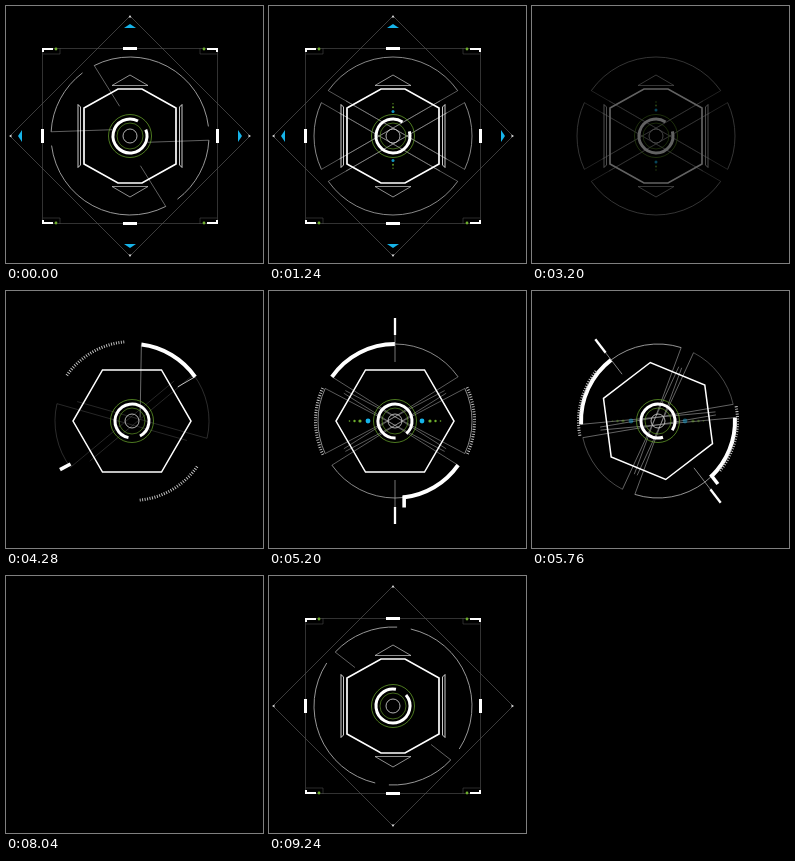
Animation, 257 px wide and 257 px high, one loop 9280 ms. Source, as an HTML page:

```html
<!DOCTYPE html>
<html lang="en">
<head>
<meta charset="utf-8">
<title>HUD target</title>
<style>
html, body { margin: 0; width: 100%; height: 100%; overflow: hidden; background: #000; }
svg { display: block; width: 100vw; height: 100vh; }
text { font: 600 3.6px "Open Sans", Arial, sans-serif; letter-spacing: 1px; }
</style>
</head>
<body>
<svg id="hud" viewBox="0 0 257 257"></svg>
<script>
const LOOP = 9280, STEP = 40;
const GREEN = '#6fae2e', CYAN = '#16b4ea', WHITE = '#fff', GREY = '#aaa', DIM = '#555';
const hud = document.getElementById('hud');

const clamp = v => Math.max(0, Math.min(1, v));
const part = (t, a, b) => clamp((t - a) / (b - a));
const out = u => 1 - (1 - u) ** 3;
const backIn = u => u * u * (2.7 * u - 1.7);

// Eased value through time/value pairs.
function key(t, ...k) {
  if (t <= k[0]) return k[1];
  for (let i = 2; i < k.length; i += 2) {
    if (t <= k[i]) return k[i - 1] + (k[i + 1] - k[i - 1]) * out(part(t, k[i - 2], k[i]));
  }
  return k[k.length - 1];
}

const polar = (r, deg) => [r * Math.cos(deg * Math.PI / 180), r * Math.sin(deg * Math.PI / 180)];
const path = (d, w, color = WHITE, extra = '') =>
  `<path d="${d}" fill="none" stroke="${color}" stroke-width="${w}" ${extra}/>`;
const line = (x1, y1, x2, y2, w, color) => path(`M${x1} ${y1}L${x2} ${y2}`, w, color);
const ring = (r, w, color) => `<circle r="${r}" fill="none" stroke="${color}" stroke-width="${w}"/>`;
const dot = (x, y, r, color) => `<circle cx="${x}" cy="${y}" r="${r}" fill="${color}"/>`;
const group = (body, transform = '', opacity = 1) =>
  opacity > 0 ? `<g transform="${transform}" opacity="${opacity}">${body}</g>` : '';
const twice = body => body + group(body, 'rotate(180)');
const four = body => twice(body + group(body, 'rotate(90)'));
const mirrored = body => body + group(body, 'scale(-1 1)');

function arc(r, a, b, w, color, extra) {
  const large = b - a > 180 ? 1 : 0;
  return path(`M${polar(r, a)}A${r} ${r} 0 ${large} 1 ${polar(r, b)}`, w, color, extra);
}

function ray(r, a, dir, length, w, color) {
  if (length <= 0) return '';
  const [x, y] = polar(r, a), [dx, dy] = polar(length, dir);
  return line(x, y, x + dx, y + dy, w, color);
}

function core(gap) {
  return ring(21.5, .7, GREEN) + ring(13, .6, GREEN) + ring(7, .8, '#ddd') +
    arc(17, gap + 20, gap + 340, 3, WHITE);
}

// Two wide and two narrow sectors; edge lines run on past the centre.
function sectors(r, lean, turn, big, small, lens, ink) {
  const [smallStart, bigStart, smallEnd, bigEnd] = lens;
  const narrow = 30 - lean, wide = 30 + lean;
  return group(twice(
    group(arc(r, -145, -35, .8, GREY), '', big) +
    group(arc(r, -25, 25, .8, GREY), '', small) +
    group(ray(r, -25, 180 - narrow, smallStart, .6, GREY) + ray(r, -145, wide, bigStart, .6, GREY) +
      ray(r, 25, 180 + narrow, smallEnd, .6, GREY) + ray(r, -35, 180 - wide, bigEnd, .6, GREY), '', ink)
  ), `rotate(${turn})`);
}

function corner() {
  return path('M-87 -84V-87H-77', 2) + dot(-74, -87, 1.4, GREEN) +
    path('M-87 -82H-70V-88', .5, DIM);
}

function frameOne() {
  const corners = mirrored(corner());
  return path('M-87.5 -87.5H87.5V87.5H-87.5Z', .6, DIM) +
    corners + group(corners, 'scale(1 -1)') + four(line(-7, -87.5, 7, -87.5, 3));
}

function shield() {
  const bar = path('M-52 -31.5V31.5L-49.5 29V-29Z', .8, WHITE);
  return path('M-12 -47H12L46 -28V28L12 47H-12L-46 28V-28Z', 1.7) +
    twice(path('M-18 -50.5L0 -61L18 -50.5Z', .7, '#ccc') + bar);
}

function diamond(cyan) {
  return path('M0 -120L120 0L0 120L-120 0Z', .6, '#666') +
    four('<path d="M-1.5 -118.5L0 -121L1.5 -118.5Z" fill="#ddd"/>' +
      group(`<path d="M-6 -108H6L0 -112Z" fill="${CYAN}"/>`, '', cyan));
}

function sceneOne(t) {
  const turn = 428 * (1 - part(t, -40, 960)) ** 2.4 - Math.min(0, t + 40);
  const gap = t < -40 ? -60 + (t + 40) * .45 : -36 - 6 * 2 ** (-t / 20);
  const lens = [25 + (t + 40) * .9, (t + 40) * 1.2, (t - 120) * .5, (t - 160) * .5]
    .map((v, i) => t < (i ? 0 : -40) ? 0 : Math.min(137, v));
  const leave = 1 - backIn(part(t, 2500, 2880));
  const size = out(part(t, -880, -120)) * leave;
  const square = part(t, -700, -300) * (1 - part(t, 2600, 2880));
  const hex = out(part(t, -800, -240));
  const cyan = t < 0 ? 0 : 1 - part(t, 1920, 2240);
  const slide = out(part(t, 960, 1600));
  const dots = twice([[26, 1.5, CYAN], [30.5, 1, GREEN], [34, .7, GREEN]]
    .map(([y, r, c]) => dot(0, -y * (.7 + .3 * slide), r, c)).join(''));
  const body =
    group(diamond(cyan), `scale(${size})`, size > .01 ? 1 : 0) +
    group(frameOne(), '', square) +
    group(sectors(79, 0, turn, 1, 1, lens, .85), '', part(t, -520, -100)) +
    group(shield(), `scale(${hex})`, hex) +
    group(core(gap), `scale(${out(part(t, -880, -560))})`) +
    group(dots, '', slide);
  return group(body, 'translate(124 130)', 1 - part(t, 2880, 3400));
}

// Two heavy arcs, only one of them ending in a cap.
function thickArcs(t) {
  const start = key(t, 3720, 35, 4280, -83, 4640, -145);
  const span = key(t, 4280, 48, 4640, 55);
  const early = 1 - part(t, 4280, 4600);
  const grown = part(t, 4280, 4400);
  const guides = ray(77, 0, 174, 73, .6, GREY) + ray(77, 48, 233, 20, .7, WHITE);
  const cap = ray(75, 48, 55, 12, 3.6, WHITE);
  return group(arc(77, 0, span, 4, WHITE) + group(guides, '', early) +
    group(group(arc(77, 0, 49, 4, WHITE), '', grown) + cap, 'rotate(180)'),
    `rotate(${start})`, part(t, 3880, 4160));
}

function brackets(t) {
  const show = part(t, 5800, 6200) * (1 - part(t, 6640, 7120));
  const grow = out(part(t, 5800, 6480));
  const word = 'LOCATION'.slice(0, Math.floor(8 * part(t, 5960, 6480)));
  const body =
    path('M-88 -73V-77H-78', 1.7) + dot(-88.5, -70, 1.7, GREEN) +
    `<text x="-74.5" y="-75.5" fill="#fff">${word}</text>` +
    path('M89 -75V-79H79', 1.7) + line(89, -79, 89 - 43 * grow, -79, .8, '#ddd') +
    dot(88.5, -73, 1.5, GREEN) +
    path('M-88 72V76H-78', 1.7) + line(-88, 76, -88 + 42 * grow, 76, .8, '#ddd') +
    dot(-88.5, 69, 1.9, GREEN) +
    path('M89 72V76H79', 1.7) + line(89, 76, 89 - 43 * grow, 76, .8, '#ddd') +
    dot(88.5, 70, 1.4, GREEN);
  return group(body, '', show);
}

function sceneTwo(t) {
  const turn = key(t, 5600, 0, 6560, -89, 6800, -90);
  const spin = key(t, 3720, -150, 4280, -12, 4640, 0);
  const gap = key(t, 3720, 250, 4280, 82, 5200, 68, 5600, 66, 6560, 35, 7520, 0);
  const dash = key(t, 3720, 330, 4280, 215, 4680, 205, 5160, 155, 5600, 155, 6560, 189, 7520, 180);
  const hexSize = key(t, 3720, 1.7, 4200, 1);
  const big = part(t, 4360, 4600);
  const small = key(t, 3960, 0, 4240, .3, 4400, .3, 4640, 1, 5640, 1, 6200, 0);
  const ink = key(t, 3960, 0, 4240, .35, 4400, .35, 4640, .9);
  const tickTurn = key(t, 4680, -65, 5160, 0);
  const tickIn = part(t, 4680, 4920) * (1 - part(t, 6600, 7000));
  const dots = part(t, 4760, 5080) * (1 - part(t, 5600, 5880)) + part(t, 7000, 7400);
  const edge = 135 * big;
  const hex = [0, 60, 120, 180, 240, 300].map(a => polar(59, a)).join('L');
  const ticks = twice(line(0, -103, 0, -86, 2.3) + line(0, -86, 0, -59, .7, GREY));
  const row = [[27, 2.4, CYAN], [35, 1.6, GREEN], [40.5, 1.2, GREEN], [45.5, .8, GREEN]]
    .map(([x, r, c]) => dot(x, 0, r, c)).join('');
  const spokes = twice(ray(76, 26, 206, 76, .6, GREY) + ray(76, -26, 154, 76, .6, GREY));
  const body =
    group(
      sectors(77, 2.2, spin, big, small, [135, edge, 135, edge], ink) +
      thickArcs(t) +
      group(path(`M${hex}Z`, 1.5), `scale(${hexSize})`, part(t, 3720, 4000)) +
      group(ticks, `rotate(${tickTurn})`, tickIn), `rotate(${turn})`) +
    group(twice(arc(79.5, 0, 50, 3, '#ccc', 'stroke-dasharray=".9 1.6"')),
      `rotate(${dash})`, part(t, 3880, 4160) * (1 - part(t, 7000, 7480))) +
    group(spokes, '', part(t, 5880, 6280) * .9) +
    group(core(gap), `scale(${out(part(t, 3720, 4040))})`) +
    group(mirrored(row), '', dots) +
    brackets(t);
  return group(body, 'translate(126 130)', 1 - part(t, 7520, 8040));
}

function draw(ms) {
  const t = Math.floor(ms % LOOP / STEP) * STEP;
  if (t >= 8400) hud.innerHTML = sceneOne(t - LOOP);
  else hud.innerHTML = t < 3720 ? sceneOne(t) : sceneTwo(t);
}

const begin = performance.now();
function tick() {
  draw(performance.now() - begin);
  requestAnimationFrame(tick);
}
tick();
</script>
</body>
</html>
```
